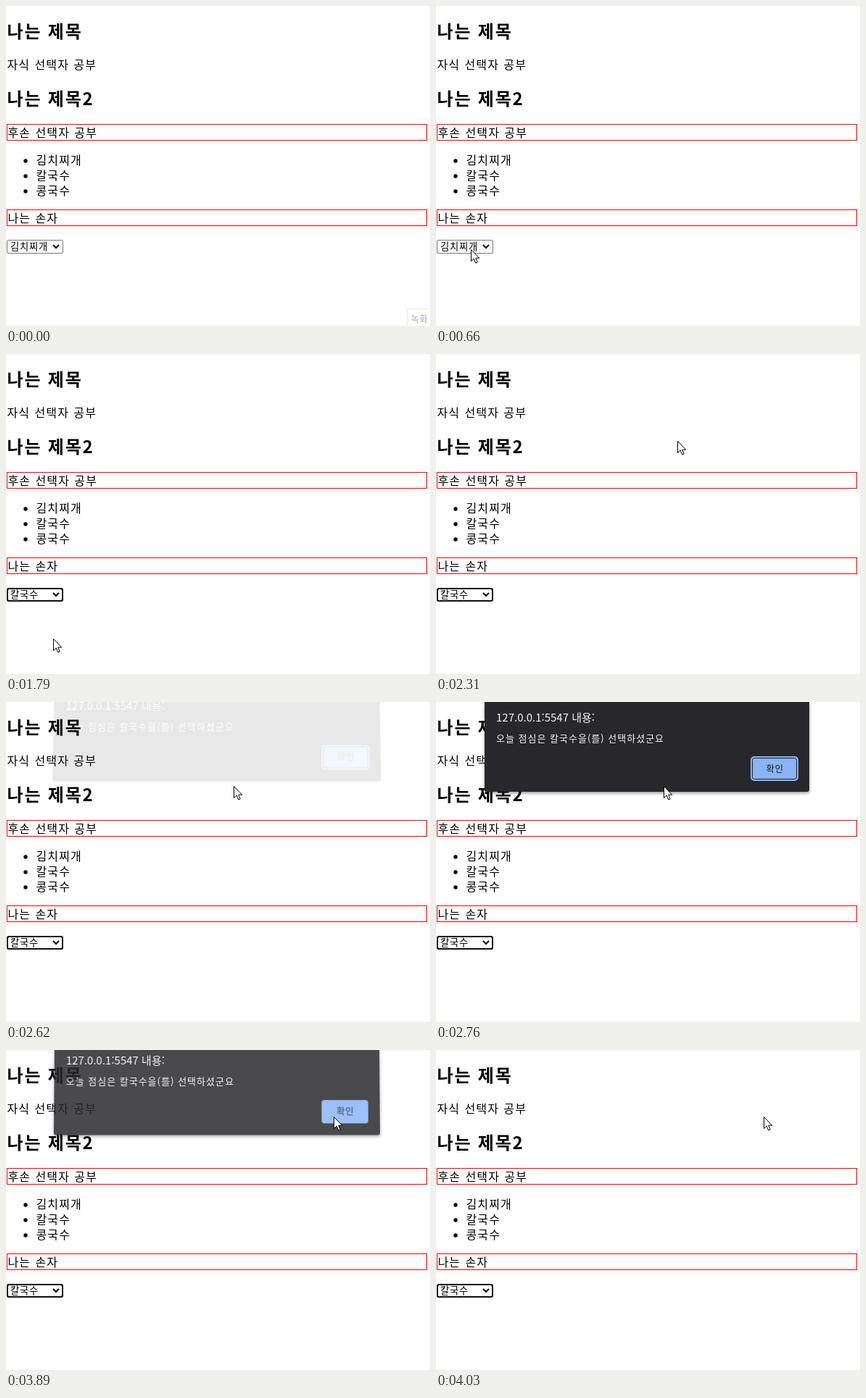
Recreate the animation shown at these times as an HTML page. Size 585 by 442 pixels, loop 4.41 s.

```html
<!DOCTYPE html>
<html lang="ko">
<head>
<meta charset="utf-8">
<style>
html, body { margin: 0; width: 100%; height: 100%; overflow: hidden; background: #fff; }
#stage { position: absolute; inset: 0; overflow: hidden; contain: strict; }
svg { position: absolute; left: 0; top: 0; width: 585px; height: 442px; overflow: hidden;
  font: 16px "Noto Sans CJK KR", "Noto Sans CJK", sans-serif; }
.body { letter-spacing: 1.15px; word-spacing: .6px; }
.head { font-size: 24px; font-weight: 700; letter-spacing: 1.8px; }
.small { font-size: 13.3px; letter-spacing: .8px; }
#dialog { transform-origin: 291px 0; filter: drop-shadow(0 2px 2px #0006); }
#list { filter: drop-shadow(0 1px 2px #0004); }
</style>
</head>
<body>
<div id="stage">
<svg>
  <g class="head">
    <text x="1.5" y="44">나는 제목</text>
    <text x="1.5" y="137">나는 제목2</text>
  </g>
  <g class="body">
    <text x="1.5" y="87">자식 선택자 공부</text>
    <text x="2.5" y="181">후손 선택자 공부</text>
    <text x="2.5" y="299">나는 손자</text>
    <g id="menu"></g>
  </g>
  <g fill="none" stroke="red">
    <rect x="1.5" y="163.5" width="579" height="22"/>
    <rect x="1.5" y="281.5" width="579" height="22"/>
  </g>
  <rect x="1.5" y="323.5" width="77" height="18" rx="1.5" fill="#fff" stroke="#767676"/>
  <rect id="focus" x="2" y="324" width="76" height="17" rx="2.5" fill="#fff" stroke="#101010" stroke-width="2"/>
  <text id="value" class="small" x="6" y="337"></text>
  <path d="M65 330l4 4 4-4" fill="none" stroke="#000" stroke-width="2"/>
  <g id="list">
    <rect x="1.5" y="341.5" width="77" height="96" fill="#fff" stroke="#767676"/>
    <rect id="mark" x="2" width="76" height="19" fill="#1e6fd9"/>
    <g id="options" class="small"></g>
  </g>
  <g id="tip">
    <rect x="553.5" y="418.5" width="40" height="30" fill="#fffffc" stroke="#efe9da"/>
    <text x="559" y="437" font-size="12" fill="#a3a6b4" letter-spacing=".8">녹화</text>
  </g>
</svg>
<svg id="dialog">
  <rect x="67" y="-20" width="448" height="144" rx="3" fill="#28282c"/>
  <g fill="#f4f4f6">
    <text x="83" y="27" font-size="15">127.0.0.1:5547 내용:</text>
    <text x="83" y="55" font-size="13" letter-spacing="1">오늘 점심은 칼국수을(를) 선택하셨군요</text>
  </g>
  <rect x="435" y="76" width="64" height="32" rx="4" fill="#8ab4f8"/>
  <g id="ring" fill="none">
    <rect x="435" y="76" width="64" height="32" rx="4" stroke="#8ab4f8" stroke-width="2"/>
    <rect x="436.5" y="77.5" width="61" height="29" rx="3" stroke="#202124"/>
  </g>
  <text x="467.5" y="96.5" font-size="12.5" letter-spacing=".6" text-anchor="middle" fill="#202124">확인</text>
</svg>
<svg>
  <path id="cursor" d="M.5.5v16l3.7-3.5 2.5 6 2.5-1-2.5-5.8h5z" fill="#fff" stroke="#000"/>
</svg>
</div>
<script>
const LOOP = 4410, STEP = 74, ROW = 19, LIST_TOP = 342;
const $ = id => document.getElementById(id);
const menu = ['김치찌개', '칼국수', '콩국수'];
const options = ['김치찌개', '된장찌개', '비빔밥', '칼국수', '콩국수'];

// Pointer moves along curves: start and end time, then start, control and end point
const moves = [
  { start: 70, end: 580, path: [[562, 424], [300, 366], [48, 336]] },
  { start: 735, end: 1190, path: [[48, 336], [70, 372], [54, 400]] },
  { start: 1790, end: 2390, path: [[65, 393], [415, 110], [314, 116]] },
  { start: 3070, end: 3660, path: [[314, 116], [400, 86], [452, 92]] }
];

const show = (id, on) => $(id).style.display = on ? '' : 'none';

// Progress from 0 to 1, held between screen updates
function progress(t, start, end, step = STEP) {
  const held = Math.floor((t - start) / step + .2) * step;
  return Math.max(0, Math.min(1, held / (end - start)));
}

function pointer(t) {
  const move = moves.findLast(m => t >= m.start);
  if (!move) return null;
  const p = progress(t, move.start, move.end), [a, b, c] = move.path;
  return a.map((v, i) => v * (1 - p) ** 2 + 2 * b[i] * p * (1 - p) + c[i] * p * p);
}

function drawDialog(t) {
  const opening = progress(t, 2620, 2760, 70);
  const closing = progress(t, 3820, 4030, 70);
  const lift = closing ? closing ** .75 : 1 - opening;
  show('dialog', t >= 2620);
  $('dialog').style.opacity = closing ? 1 - closing ** 1.7 : .11 + .89 * opening;
  $('dialog').style.transform = lift
    ? `translateY(${-16 * lift}px) perspective(1000px) rotateX(${5 * lift}deg)` : 'none';
  show('ring', t < 3740);
}

function drawSelect(t, y) {
  const row = Math.max(0, Math.floor((y - LIST_TOP) / ROW));
  show('focus', t >= 735);
  show('list', t >= 735 && t < 1500);
  $('list').style.opacity = t < 1420 ? 1 : .5;
  $('value').textContent = options[t < 1420 ? 0 : 3];
  $('mark').setAttribute('y', LIST_TOP + row * ROW);
  [...$('options').children].forEach((label, i) => label.setAttribute('fill', i === row ? '#fff' : '#000'));
}

function draw(t) {
  const pos = pointer(t);
  show('cursor', pos);
  if (pos) $('cursor').setAttribute('transform', `translate(${pos.map(Math.round)})`);
  show('tip', t < 70);
  drawSelect(t, pos ? pos[1] : 0);
  drawDialog(t);
}

$('menu').innerHTML = menu.map((name, i) =>
  `<circle cx="27" cy="${214 + i * 21}" r="2.7"/><text x="41.5" y="${219 + i * 21}">${name}</text>`).join('');
$('options').innerHTML = options.map((name, i) =>
  `<text x="6" y="${LIST_TOP + 14 + i * ROW}">${name}</text>`).join('');

const begin = performance.now();
function tick() {
  draw((performance.now() - begin) % LOOP);
  requestAnimationFrame(tick);
}
tick();
</script>
</body>
</html>
```
